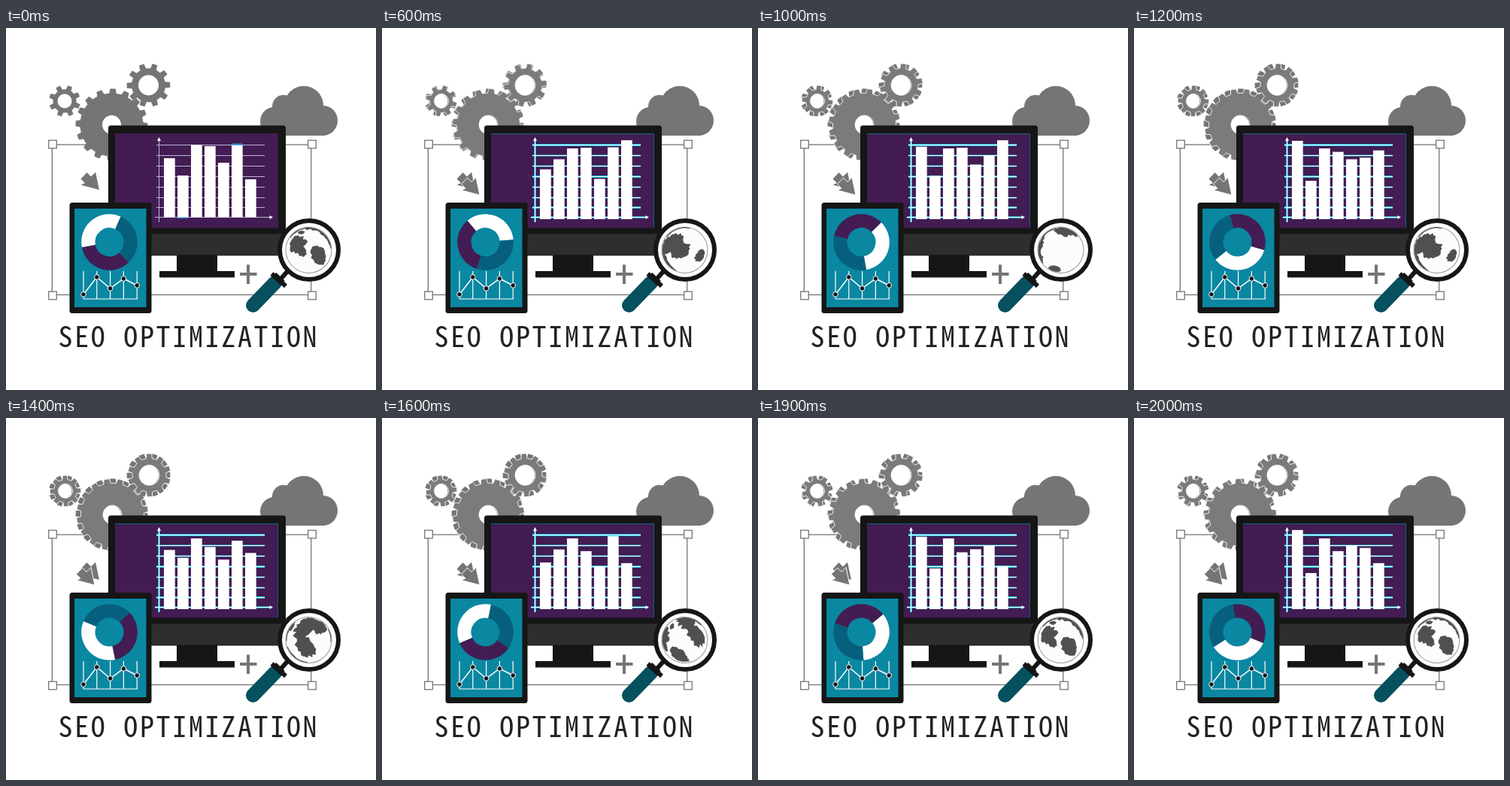
These frames come from a looping animation (492 by 481 pixels, 2100 ms). An HTML page:

```html
<!DOCTYPE html>
<html lang="en">
<head>
<meta charset="utf-8">
<title>SEO optimization</title>
<style>
  html, body { margin: 0; width: 100%; height: 100%; overflow: hidden; background: #fff; }
  svg { display: block; }
  .title { font: 300 38px "Noto Sans Mono CJK JP", "Noto Sans Mono CJK SC", "Noto Sans Mono", monospace; fill: #222; text-anchor: middle; }
</style>
</head>
<body>
<svg id="stage" width="492" height="481" viewBox="0 0 492 481"></svg>
<script>
const GREY = '#757575', BLACK = '#161616', PURPLE = '#431c53', TEAL = '#0a87a1', DEEP = '#075f7e', WHITE = '#fff';
const LOOP = 2100, STEP = 100, TAU = Math.PI * 2;
const stage = document.getElementById('stage');

function add(tag, attrs, parent = stage) {
  const el = document.createElementNS('http://www.w3.org/2000/svg', tag);
  set(el, attrs);
  parent.append(el);
  return el;
}
function set(el, attrs) {
  for (const k in attrs) el.setAttribute(k, attrs[k]);
}
const group = (attrs = {}) => add('g', attrs);
const box = (x, y, width, height, fill, more = {}, parent) =>
  add('rect', { x, y, width, height, fill, ...more }, parent);
const disc = (cx, cy, r, fill, more = {}, parent) => add('circle', { cx, cy, r, fill, ...more }, parent);
const path = (d, attrs, parent) => add('path', { d, ...attrs }, parent);
const rad = deg => deg * Math.PI / 180;
const at = (r, deg) => `${(r * Math.sin(rad(deg))).toFixed(2)} ${(-r * Math.cos(rad(deg))).toFixed(2)}`;

// Selection frame with corner handles
box(61.3, 155, 344.4, 199.5, 'none', { stroke: GREY, 'stroke-width': 1.3 });
for (const x of [62, 407])
  for (const y of [154.5, 355.5])
    box(x - 5.3, y - 5.3, 10.6, 10.6, WHITE, { stroke: GREY, 'stroke-width': 1.3 });

// Gears
function gearPath({ n, outer, inner, hole, phase }) {
  const p = 360 / n;
  let d = '';
  for (let i = 0; i < n; i++) {
    const a = phase + i * p;
    d += `${i ? 'L' : 'M'}${at(inner, a - p * .29)}L${at(outer, a - p * .19)}`
      + `L${at(outer, a + p * .19)}L${at(inner, a + p * .29)}`
      + `A${inner} ${inner} 0 0 1 ${at(inner, a + p * .71)}`;
  }
  return d + `ZM0 ${-hole}A${hole} ${hole} 0 1 0 0 ${hole}A${hole} ${hole} 0 1 0 0 ${-hole}Z`;
}
const gears = [
  { x: 140.5, y: 128.5, n: 16, outer: 48, inner: 42, hole: 12.5, phase: 2, dir: 1 },
  { x: 78, y: 97, n: 8, outer: 21, inner: 15.5, hole: 9.5, phase: 20, dir: -2 },
  { x: 189.5, y: 76, n: 10, outer: 29, inner: 22.5, hole: 13.5, phase: 17, dir: -1.6 }
];
for (const g of gears) {
  const d = gearPath(g);
  path(d, { fill: GREY, transform: `translate(${g.x} ${g.y})` });
  g.ghost = path(d, { fill: '#7b7b7b', stroke: WHITE, 'stroke-width': .8 });
}

// Cloud
disc(396, 103, 26, GREY);
disc(369, 104, 15, GREY);
disc(357, 124, 19, GREY);
disc(421, 123, 20, GREY);
box(357, 106, 64, 37, GREY);

// Arrow
const arrowPath = 'M99.5 200.5L107.5 192L113 197.5L119 191.5L124 215L99.5 208.5L105 206Z';
path(arrowPath, { fill: GREY });
const arrow = path(arrowPath, { fill: GREY, stroke: WHITE, 'stroke-width': 1 });

// Monitor
box(227, 300, 54, 26, BLACK);
box(204, 323, 100, 8.5, BLACK);
path('M136 270H372V297Q372 302 367 302H141Q136 302 136 297Z', { fill: '#2e2e2e', stroke: BLACK });
path('M136 273.5V133Q136 129.5 139.5 129.5H368.5Q372 129.5 372 133V273.5Z', { fill: BLACK });
box(145, 140, 217, 125.5, PURPLE);
const edge = path('M145 140.5H362M361.5 140V265', { fill: 'none', stroke: '#0d6577' });

// Bar chart
const rows = Array.from({ length: 7 }, (_, i) => Math.round(155 + 13.9 * i) + .5);
const glow = group({ fill: 'none', stroke: '#12c4e6' });
const grid = group({ fill: 'none' });
rows.forEach((y, i) => {
  path(`M200 ${y}H344`, { 'stroke-width': i % 3 ? 2.2 : 3.2 }, glow);
  path(`M200 ${y}H344`, {}, grid);
});
const axes = 'M203.5 148V258M198 251.5H353';
path(axes, { 'stroke-width': 2.6 }, glow);
path(axes, {}, grid);
path('M203.5 145L206 150H201ZM355 251.5L350.5 249V254Z', { fill: WHITE });
const specks = group();
box(228, 251, 14, 2, '#2b8fce', {}, specks);
box(300, 153.5, 15, 2, '#2b8fce', {}, specks);

// Bar tops: resting place, middle while moving, share of the fast and slow waves
const bars = [
  { rest: 173, mid: 170, fast: 22, slow: 0 },
  { rest: 196, mid: 189, fast: -16, slow: 2 },
  { rest: 155, mid: 160, fast: 0, slow: 0 },
  { rest: 157, mid: 168, fast: 0, slow: 11 },
  { rest: 179, mid: 186, fast: 14, slow: -4 },
  { rest: 156, mid: 165, fast: -8, slow: 0 },
  { rest: 201, mid: 171, fast: 0, slow: 27 }
];
bars.forEach((b, i) => b.el = box(210 + 18 * i, b.rest, 14.7, 78, WHITE));

// Tablet
box(84.5, 232, 109, 147, BLACK, { rx: 3.5 });
box(91, 240, 95.5, 131, TEAL);
const donut = group();
[[259, 384, WHITE], [24, 137, DEEP], [137, 259, PURPLE]].forEach(([a, b, fill]) =>
  path(`M${at(37.3, a)}A37.3 37.3 0 0 1 ${at(37.3, b)}L${at(19, b)}A19 19 0 0 0 ${at(19, a)}Z`, { fill }, donut));
const dots = [354, 331, 346, 333, 342].map((y, i) => [103 + 17.8 * i, y]);
path(dots.map(([x]) => `M${x} 323V360`).join('') + 'M103 360H175',
  { fill: 'none', stroke: WHITE, 'stroke-width': 1.2 });
path('M' + dots.join('L'), { fill: 'none', stroke: WHITE, 'stroke-width': 1.5 });
for (const [x, y] of dots) disc(x, y, 3.3, BLACK, { stroke: WHITE, 'stroke-width': 1 });

// Plus sign
path('M311 327H333.5M322 314.5V340', { stroke: GREY, 'stroke-width': 4 });

// Magnifier
path('M379 318L363 336', { stroke: BLACK, 'stroke-width': 6 });
path('M358 338L328.5 368.5', { stroke: '#06505f', 'stroke-width': 19, 'stroke-linecap': 'round' });
path('M353.5 326.5L372 343', { stroke: BLACK, 'stroke-width': 6 });
path('M356.5 328L368 339', { stroke: BLACK, 'stroke-width': 8 });
disc(403, 295, 39, WHITE, { stroke: BLACK, 'stroke-width': 6 });

// Globe: ragged patches of land on a sphere
const R = 30.5, TILT = rad(15), HOME = -75;
let seed = 7;
const random = () => (seed = seed * 16807 % 2147483647) / 2147483647;
function patch(lon, lat, w, h) {
  return Array.from({ length: 26 }, (_, i) => {
    const a = i / 26 * TAU, k = .78 + .4 * random();
    return [lon + w * k * Math.cos(a), lat + h * k * Math.sin(a)];
  });
}
const lands = [
  patch(-100, 48, 36, 24), patch(-93, 20, 11, 12), patch(-60, -15, 19, 32), patch(-40, 73, 20, 9),
  patch(18, 5, 24, 32), patch(70, 52, 68, 24), patch(95, 18, 28, 16), patch(134, -25, 20, 14)
];
const globe = group({ transform: 'translate(402.5 295) rotate(-35)' });
disc(0, 0, R, '#fcfcfc', { stroke: '#999' }, globe);
const land = path('', { fill: '#505050', stroke: '#505050', 'stroke-linejoin': 'round' }, globe);

function project([lon, lat], centre) {
  const l = rad(lon - centre), b = rad(lat);
  const x = Math.cos(b) * Math.sin(l), flat = Math.cos(b) * Math.cos(l);
  const y = Math.sin(b) * Math.cos(TILT) - flat * Math.sin(TILT);
  const z = Math.sin(b) * Math.sin(TILT) + flat * Math.cos(TILT);
  const k = (R - 1) / (z < 0 ? Math.hypot(x, y) : 1);
  return { x: x * k, y: -y * k, front: z > 0 };
}
function landPath(centre) {
  return lands.map(shape => {
    const pts = shape.map(p => project(p, centre));
    if (!pts.some(p => p.front)) return '';
    return 'M' + pts.map(p => `${p.x.toFixed(1)} ${p.y.toFixed(1)}`).join('L') + 'Z';
  }).join('');
}

// Title, one even pitch per letter
const title = 'SEO OPTIMIZATION';
add('text', { class: 'title', y: 424, x: [...title].map((_, i) => (79 + i * 21.67).toFixed(1)).join(' ') })
  .textContent = title;

// Motion: a short burst, a one-step pause, then a long burst; n counts steps
const wave = (n, peak, period) => Math.cos((n - peak) / period * TAU);
const turnKeys = [[6, 61], [8, 0], [10, 146], [14, 269], [17, 387], [20, 574]];

function donutTurn(n) {
  const i = turnKeys.findIndex(k => n <= k[0]);
  const [n1, b] = turnKeys[i], [n0, a] = turnKeys[i - 1] || [n1 - 1, b];
  return a + (b - a) * (n - n0) / (n1 - n0);
}
function globeLon(n) {
  const u = n < 8 ? (n - 5) / 3 : (n - 8) / 12;
  return HOME - 360 * (1 - (1 - u) ** 1.7);
}
const show = (el, on) => set(el, { visibility: on ? 'visible' : 'hidden' });

function draw(n) {
  const moving = n >= 6 && n !== 8;
  for (const el of [glow, edge, arrow, ...gears.map(g => g.ghost)]) show(el, moving);
  show(specks, !moving);
  set(grid, { stroke: moving ? WHITE : '#b9b3dc' });
  for (const g of gears)
    set(g.ghost, { transform: `translate(${g.x + 1} ${g.y}) rotate(${(n - 3) * g.dir})` });
  set(arrow, { transform: `translate(${2 + 8 * wave(n, 17, 6)} 7)` });
  set(donut, { transform: `translate(137.5 284.5) rotate(${moving ? donutTurn(n) : 0})` });
  set(land, { d: landPath(moving ? globeLon(n) : HOME) });
  const floor = moving ? 254 : 251.5;
  for (const b of bars) {
    const y = moving ? b.mid + b.fast * wave(n, 15.9, 9) + b.slow * wave(n, 18, 20) : b.rest;
    set(b.el, { y, height: floor - y });
  }
}

const start = performance.now();
function tick() {
  draw(Math.floor((performance.now() - start) % LOOP / STEP));
  requestAnimationFrame(tick);
}
tick();
</script>
</body>
</html>
```
